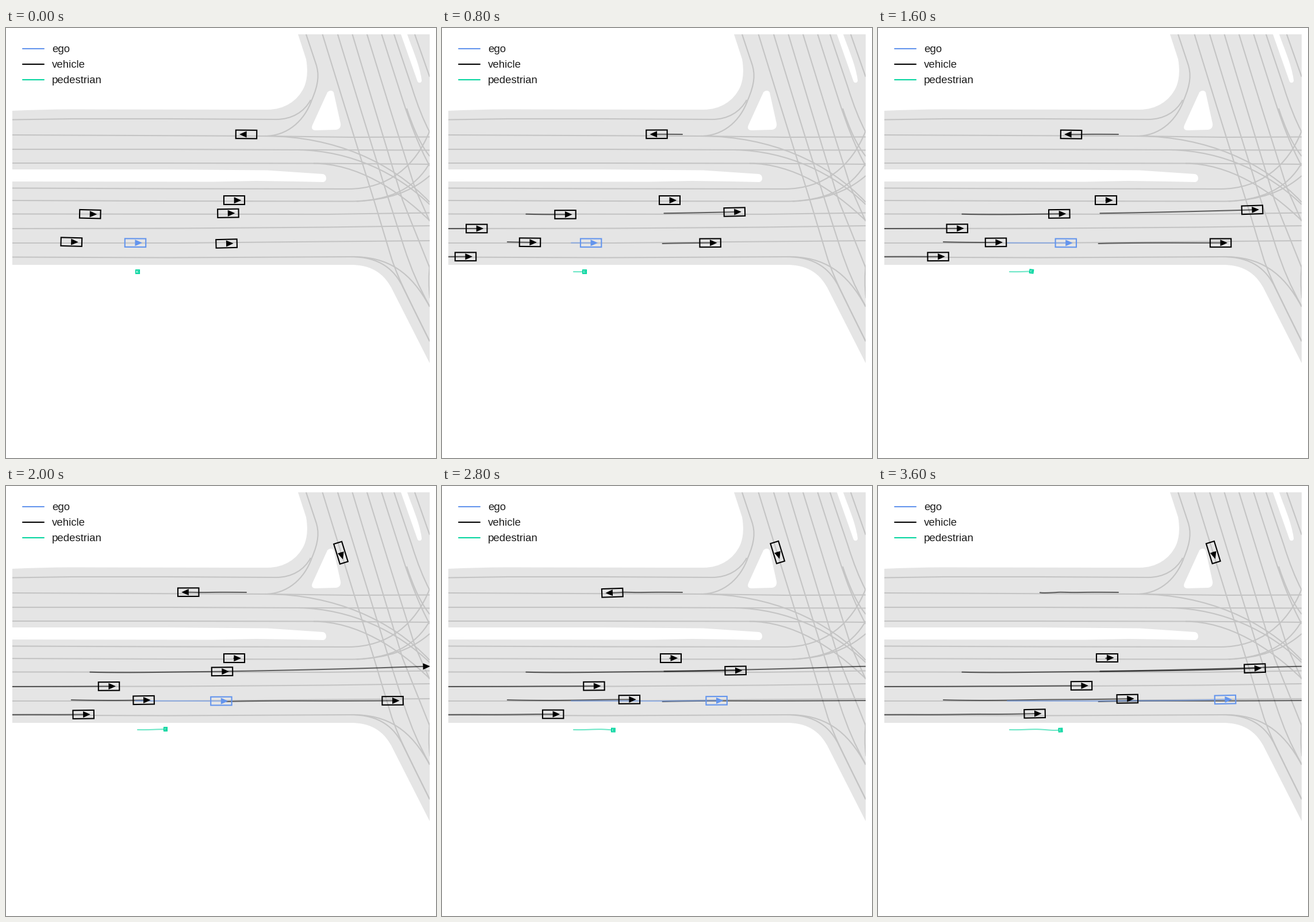
Recreate the animation shown at these times as a matplotlib script. Size 748 by 748 pixels, loop 3.8 s.

```python
import numpy as np
import matplotlib.pyplot as plt
from matplotlib.animation import FuncAnimation
from matplotlib.patches import PathPatch, Polygon, Rectangle
from matplotlib.path import Path

SIZE, DPI = 748, 100
PT = 72 / DPI
LO, HI = 11, 737
FRAMES, STEP = 19, 200
KEYS = [0, 800, 1600, 2000, 2400, 3200, 3600]
ROAD, LANE = "#e5e5e5", "#c4c4c4"
EGO, CAR, PED = "#6495ed", "#000000", "#06d6a0"

plt.rcParams["font.family"] = "Liberation Sans"
fig = plt.figure(figsize=(SIZE / DPI, SIZE / DPI), dpi=DPI, facecolor="white")
ax = fig.add_axes([0, 0, 1, 1])
ax.set_xlim(0, SIZE)
ax.set_ylim(SIZE, 0)
ax.axis("off")
view = Rectangle((LO, LO), HI - LO, HI - LO, transform=ax.transData)


def path(spec):
    """Parse 'M x y L x y C x y x y x y Q x y x y Z' into a Path."""
    code = {"M": Path.MOVETO, "L": Path.LINETO, "C": Path.CURVE4, "Q": Path.CURVE3}
    verts, codes, pending, op = [], [], [], None
    for token in spec.split():
        if token == "Z":
            verts.append(verts[0])
            codes.append(Path.CLOSEPOLY)
        elif token in code:
            op = code[token]
        else:
            pending.append(float(token))
            if len(pending) == 2:
                verts.append(pending)
                codes.append(op)
                pending = []
    return Path(verts, codes)


def add(patch):
    ax.add_patch(patch)
    patch.set_clip_path(view)
    return patch


def area(spec, color):
    add(PathPatch(path(spec), fc=color, ec="none", zorder=1))


def lane(spec):
    add(PathPatch(path(spec), fc="none", ec=LANE, lw=2.1 * PT, zorder=2))


# Road surface, median and islands
area("M 11 144 C 45 142.5 80 141.5 115 141.5 L 370 142 L 455 142 "
     "C 484 142 507 127 518 104 C 525 89 525 70 522 54 L 508 11 L 737 11 "
     "L 737 583 L 673 457 C 658 426 635 412 600 412 L 11 412 Z", ROAD)
area("M 11 246 L 280 246 L 455 247.5 L 551 254 C 559 255 559 268 551 268 "
     "L 505 267 L 435 266 L 360 267.5 L 11 267 Z", "white")
area("M 559 112 C 562 108 568 108 570 112 L 582 166 C 583 173 579 177 573 177 "
     "L 539 178 C 532 178 531 174 533 169 Z", "white")
area("M 687 11 L 698 11 C 706 35 719 62 723 90 C 724 96 717 97 715.5 92 Z", "white")

# Westbound lanes
lane("M 11 159.5 L 115 158 L 280 158 L 470 159 C 497 159 519 146 530 125")
lane("M 11 186 L 450 188 C 489 188 519 162 532 125 C 544 97 545 80 539 62 L 522 11")
lane("M 450 188 L 600 190 L 737 189.5")
lane("M 11 211 L 280 211 L 520 212 L 737 212.5")
lane("M 11 235 L 280 235 L 540 235.5 L 737 237")
lane("M 455 188 C 570 189 670 232 737 303")
lane("M 510 212 C 600 214 680 252 737 307")
lane("M 535 235.5 C 610 236 680 280 737 335")

# Eastbound lanes
lane("M 11 278.5 L 280 279.5 L 595 280 C 665 280 713 240 737 179")
lane("M 11 300 L 280 301 L 600 301.5 C 670 301 713 277 737 235")
lane("M 610 301.5 C 664 299 705 285 737 257")
lane("M 11 323.5 L 560 324 L 737 321.5")
lane("M 11 349 L 300 348.5 L 560 346.5 L 737 344")
lane("M 11 374 L 300 374 L 560 371.5 L 737 370")
lane("M 11 398.5 L 280 399.5 L 600 398 C 665 397 705 425 737 485")
lane("M 600 398 C 650 398 676 420 691 452 L 737 545")

# Crossing lanes
lane("M 550.5 11 L 590 139 L 642 306 L 671 402 C 684 440 700 470 737 545")
lane("M 577 11 L 618 145 L 663 290 L 692 380 C 705 420 718 450 737 484")
lane("M 602.5 11 L 645 152 L 690 300 L 737 417")
lane("M 628 11 L 670 147 L 712 280 L 737 336")
lane("M 653.5 11 L 690 125 C 704 168 718 205 737 240")
lane("M 675 11 L 706 103 C 716 135 726 160 737 181")
lane("M 697 140 C 709 176 721 203 737 223")
lane("M 711 11 L 737 85")
lane("M 737.5 412 C 735 428 735 450 737.5 470")

# Legend
for y, name, color in ((36, "ego", EGO), (63, "vehicle", CAR), (90, "pedestrian", PED)):
    ax.plot([29, 66], [y, y], color=color, lw=2.1 * PT, solid_capstyle="round")
    ax.text(80.2, y + 6.2, name, size=18.67 * PT, color="#1c1c1c", va="baseline")


def spline(keys, vals, t):
    """Cubic Hermite curve through the keys."""
    keys, vals = np.asarray(keys, float), np.asarray(vals, float)
    slope = np.gradient(vals, keys, edge_order=2)
    i = np.clip(np.searchsorted(keys, t, "right") - 1, 0, len(keys) - 2)
    h = keys[i + 1] - keys[i]
    u = (t - keys[i]) / h
    return ((1 + 2 * u) * (1 - u) ** 2 * vals[i] + u * (1 - u) ** 2 * h * slope[i]
            + u * u * (3 - 2 * u) * vals[i + 1] + u * u * (u - 1) * h * slope[i + 1])


class Agent:
    def __init__(self, color, xs, ys, keys=KEYS, heading=None, start=0, end=3600,
                 size=(36.4, 14.6), arrow=(-0.6, 12, 5.6)):
        t = np.arange(FRAMES) * STEP
        self.pos = np.column_stack([spline(keys, xs, t), spline(keys, ys, t)])
        if heading is None:
            dx, dy = np.gradient(self.pos, axis=0).T
            self.angle = np.arctan2(dy, dx)
        else:
            self.angle = np.radians(np.interp(t, keys, heading))
        self.first, self.last = start // STEP, end // STEP
        w, h = size[0] / 2, size[1] / 2
        self.corners = np.array([(-w, -h), (w, -h), (w, h), (-w, h)])
        back, tip, half = arrow
        self.head = np.array([(back, -half), (tip, 0), (back, half)])
        self.trail, = ax.plot([], [], color=color, alpha=0.58, lw=2.1 * PT,
                              solid_capstyle="round", zorder=3)
        self.trail.set_clip_path(view)
        self.box = add(Polygon(self.corners, fc="none", ec=color, lw=2.1 * PT,
                               joinstyle="miter", zorder=4))
        self.tri = add(Polygon(self.head, fc=color, ec="none", zorder=4))

    def show(self, n):
        past = self.pos[self.first:min(n, self.last) + 1]
        self.trail.set_data(past[:, 0], past[:, 1])
        c, s = np.cos(self.angle[n]), np.sin(self.angle[n])
        turn = np.array([(c, s), (-s, c)])
        corners = self.corners @ turn + self.pos[n]
        self.box.set_xy(corners)
        self.tri.set_xy(self.head @ turn + self.pos[n])
        alive = self.first <= n <= self.last
        inside = corners.min() >= LO and corners.max() <= HI
        self.box.set_visible(alive and inside)
        self.tri.set_visible(alive)


agents = [
    Agent(CAR, [146.3, 214.5, 315.3, 376, 442.4, 581.4, 655.5],
          [323.7, 324.4, 323.3, 322.7, 322, 319.6, 317.2]),
    Agent(CAR, [386.4, 508.8, 651, 726, 802], [322.3, 320, 316.3, 313.9, 313.7],
          keys=[0, 800, 1600, 2000, 2400]
          , end=2400),
    Agent(CAR, [383.6, 466.6, 596, 672.6, 756], [375, 373.8, 373.8, 373.5, 373],
          keys=[0, 800, 1600, 2000, 2400], end=2400),
    Agent(CAR, [-18, 60.3, 137.7, 179, 221.6, 308.3, 354],
          [349, 348.9, 348.7, 348.4, 348.3, 347.7, 347.4]),
    Agent(CAR, [-14, 41, 104.6, 134.7, 162.8, 228.8, 272.6],
          [398, 397.7, 397.7, 397.4, 397, 396.8, 396]),
    Agent(CAR, [113.8, 153, 205, 239.6, 280.2, 377, 433.8],
          [372.1, 372.8, 372.9, 372.5, 371.8, 371, 370.2]),
    Agent(CAR, [418, 373.5, 336, 317.2, 308.7, 285, 281.8],
          [185, 184.8, 185.1, 184.7, 185.2, 185.8, 185.4],
          keys=KEYS[:-1] + [3400], end=3400),
    Agent(CAR, [397.3, 396.2, 396.6, 397, 398, 398.2, 398.6],
          [299.7, 299.7, 299.6, 299.6, 299.4, 299.2, 298.8], heading=[0] * 7),
    Agent(CAR, [582.5, 583.5, 583.4, 583.2], [116.2, 115.4, 115.6, 115.5],
          keys=[2000, 2400, 3200, 3600], heading=[72.8] * 4, start=1800),
    Agent(EGO, [225, 259.1, 326.8, 374.4, 423.6, 537.4, 604],
          [373.7, 373.8, 373.9, 374.1, 373.7, 372.8, 371.5]),
    Agent(PED, [228.9, 248, 267, 277.5, 288, 307.5, 317.5],
          [424, 424, 423.3, 423.2, 423.8, 425, 424.6],
          heading=[0, 0, 8, 0, 0, 2, -3], size=(5.8, 5.8), arrow=(-0.4, 3, 2.8)),
]


def draw(n):
    for agent in agents:
        agent.show(n)
    return []


anim = FuncAnimation(fig, draw, frames=FRAMES, interval=STEP, repeat=True,
                     repeat_delay=0, blit=False, init_func=lambda: draw(0))
plt.show()
```
